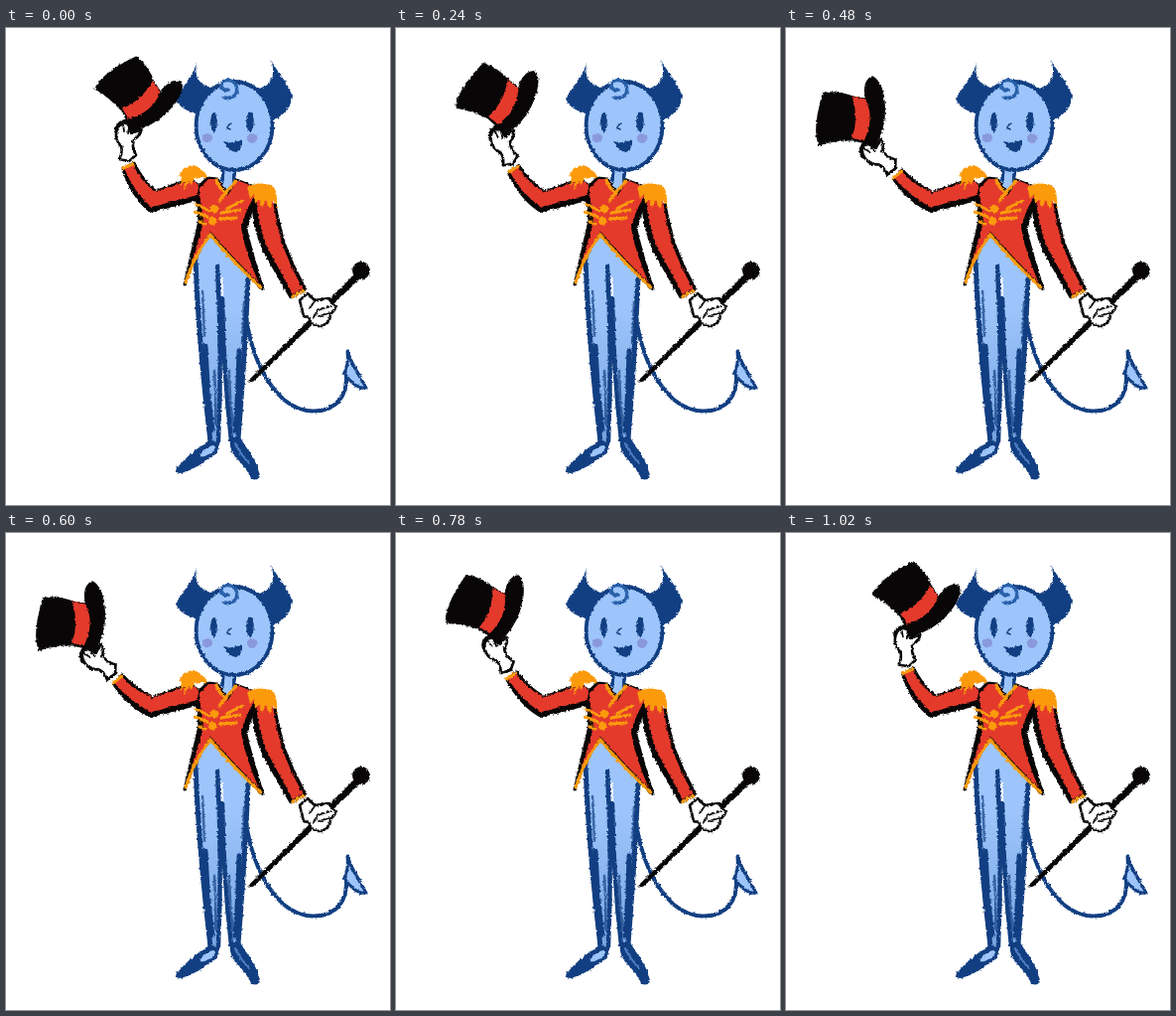
Write an HTML page that moves like this. It is 387 by 480 pixels and loops after 1.08 s.

```html
<!DOCTYPE html>
<html lang="en">
<head>
<meta charset="utf-8">
<title>Tipping the hat</title>
<style>
  html, body { margin: 0; width: 100%; height: 100%; overflow: hidden; background: #fff; }
  svg { display: block; width: 100vw; height: 100vh; }
  path, line { stroke-linecap: round; stroke-linejoin: round; }
  .navy { fill: #123f82; }
  .skin { fill: #9dc5fb; }
  .ink { fill: none; stroke: #123f82; }
  .red { fill: #e43a2c; }
  .gold { fill: #fb9b0c; }
  .braid { fill: none; stroke: #fb9b0c; stroke-width: 3; }
  .edge { fill: #080606; stroke: #080606; stroke-width: 3; }
  .glove { fill: #fff; stroke: #080606; stroke-width: 2.6; }
  .crease { fill: none; stroke: #080606; stroke-width: 1.8; }
</style>
</head>
<body>
<svg viewBox="0 0 387 480">
  <defs>
    <filter id="brush" filterUnits="userSpaceOnUse" x="0" y="0" width="387" height="480" color-interpolation-filters="sRGB">
      <feTurbulence type="fractalNoise" baseFrequency=".38" numOctaves="2" seed="4"/>
      <feDisplacementMap in="SourceGraphic" scale="3.2" xChannelSelector="R" yChannelSelector="G"/>
    </filter>
    <linearGradient id="leg" x1="0" y1="210" x2="0" y2="415" gradientUnits="userSpaceOnUse">
      <stop offset=".35" stop-color="#9dc5fb"/>
      <stop offset="1" stop-color="#78a5e2"/>
    </linearGradient>
  </defs>

  <g filter="url(#brush)">
    <!-- tail -->
    <path class="ink" stroke-width="4" d="M241 285C246 325 258 354 280 374C298 389 322 389 335 376C342 368 344 359 343 347"/>
    <path class="skin" stroke="#123f82" stroke-width="3" d="M344 325C348 338 356 350 363 362C356 364 347 357 341 347C344 341 345 334 344 325Z"/>
    <path class="ink" stroke-width="3" d="M345 327C347 336 352 343 356 349"/>

    <!-- legs -->
    <path fill="url(#leg)" d="M207 207L190 232Q193 310 206 416L214 416Q218 340 216 250L219 250Q219 340 226 416L235 416Q240 330 245 252Z"/>
    <path class="ink" stroke-width="5" d="M191 233Q194 315 206 416M244 252Q240 340 234 413"/>
    <path class="ink" stroke-width="4.5" d="M213 240Q218 325 214 416M218 272Q219 345 227 415"/>
    <path class="ink" stroke-width="5" d="M201 320Q203 370 208 405M235 325Q234 370 231 405"/>
    <path class="ink" stroke-width="2.5" opacity=".7" d="M210 345Q212 375 211 398M225 345Q226 380 229 400M198 265L200 310M240 275L238 318"/>

    <!-- feet -->
    <path class="navy" d="M204 414L214 417Q216 428 204 434Q190 444 176 448Q169 448 172 443Q184 429 196 421Q203 418 204 414Z"/>
    <path class="skin" d="M203 422Q211 418 211 422Q209 428 200 431Q190 433 203 422Z"/>
    <path class="navy" d="M226 412L236 412Q241 421 248 430Q254 441 256 451Q253 457 247 453Q241 441 233 434Q224 425 226 412Z"/>
    <path fill="none" stroke="#4d7dc4" stroke-width="2" d="M231 418Q238 431 245 438"/>

    <!-- neck -->
    <path class="skin" d="M219 138L232 138L230 156L224 166L215 154Z"/>
    <path class="ink" stroke-width="3.5" d="M219 140L218 153M232 139L229 153"/>

    <!-- jacket -->
    <path class="edge" d="M203 151L190 164Q194 180 195 194Q188 224 180 258Q190 228 206 207Q228 233 259 263Q247 225 242 203Q245 186 253 173L250 160L232 153L223 167L213 152Z"/>
    <path class="edge" d="M249 176Q250 202 260 224L287 271L302 263Q288 238 280 216Q275 198 271 178Z"/>
    <path class="red" d="M204 152L193 163Q198 180 199 195Q192 220 183 249Q194 222 206 205Q228 230 255 257Q241 226 237 201Q241 184 250 170L250 160L233 153L223 169L213 152Z"/>
    <path class="red" d="M252 168Q253 196 263 220L289 268L299 262Q285 237 277 213Q272 194 269 174Z"/>
    <path class="braid" stroke-width="2.5" d="M181 256Q190 228 206 208Q230 237 257 261"/>
    <path class="braid" d="M212 153Q215 163 222 165L232 154M222 165L215 174"/>
    <path class="braid" d="M191 177L205 184M191 185L203 190M195 195L201 197M217 186L236 183M216 192L232 191M222 182L238 174"/>
    <circle class="gold" cx="210" cy="182" r="4.2"/>
    <circle class="gold" cx="208" cy="194" r="4.2"/>
    <path class="braid" stroke-width="4" d="M289 270L300 264"/>
    <path class="gold" d="M243 160Q253 154 268 158Q274 163 273 181L269 173L266 182L262 173L258 181L255 172L251 177L250 167L246 172Z"/>

    <!-- cane -->
    <path class="edge" stroke-width="1" d="M246 355L355 246L358 249L249 354Z"/>
    <circle cx="358" cy="244" r="9" fill="#080606"/>
    <path class="glove" d="M296 274L304 267L311 274L325 272Q328 277 333 280Q331 285 327 288Q327 297 318 300Q308 301 305 291L300 290Z"/>
    <path class="crease" stroke-width="2.4" d="M311 275L306 282M328 280L314 284L310 291M326 287L315 290"/>

    <!-- head -->
    <path class="navy" d="M193 32C190 45 182 54 171 71C174 80 184 85 195 86L211 60C195 60 188 48 193 32Z"/>
    <path class="navy" d="M267 32C272 42 283 54 289 68C287 82 276 92 264 94L248 61C266 63 273 48 267 32Z"/>
    <ellipse class="skin" cx="230" cy="98.5" rx="38.5" ry="44.5" stroke="#123f82" stroke-width="3.8"/>
    <path class="skin" d="M216 61C214 50 228 48 233 58C236 69 226 76 218 73L220 66Z"/>
    <path fill="none" stroke="#285fa9" stroke-width="3.5" d="M217 60C215 51 228 50 232 58C235 67 228 72 220 70M217 59Q220 64 224 62"/>
    <ellipse class="navy" cx="209.5" cy="95" rx="3.3" ry="10"/>
    <ellipse class="navy" cx="246" cy="94.5" rx="3.7" ry="10"/>
    <circle cx="203" cy="110.5" r="5" fill="#8a98dc"/>
    <circle cx="248" cy="111" r="5" fill="#8a98dc"/>
    <path class="ink" stroke-width="1.5" d="M227 96L222 100L226 102"/>
    <path class="navy" d="M219 114Q229 117 238 112Q239 122 232 125Q224 124 219 114Z"/>
  </g>

  <g filter="url(#brush)">
    <path class="edge" d="M186 152L147 166Q139 176 146 184L194 172L193 158Z"/>
    <g id="forearm">
      <path class="edge" d="M118 142L129 136Q137 153 150 164L152 181L145 184Q127 169 118 142Z"/>
      <path class="red" d="M119 141L128 137Q136 155 150 164L151 178L146 180Q129 165 119 141Z"/>
      <path class="braid" stroke-width="4" d="M118 141L128 137"/>
      <g id="hand">
        <path class="edge" stroke-width="1" d="M91 61Q98 46 131 30Q142 39 148 54L157 68L124 95L117 82Q104 68 91 61Z"/>
        <path class="red" d="M117 81Q137 73 148 53L157 67Q147 87 126 96Q122 88 117 81Z"/>
        <path class="edge" stroke-width="1" d="M111 103C110 97 117 93 124 93Q148 86 156 67C160 59 168 52 176 55C179 67 161 91 136 100C124 104 114 108 111 103Z"/>
        <path class="glove" d="M114 132Q118 125 116 119Q110 113 111 106Q112 98 118 95L124 97L126 105L136 103Q136 108 129 112Q126 119 131 128L124 134Z"/>
        <path class="crease" d="M118 97L119 104M124 99L123 106M126 106L137 103"/>
      </g>
    </g>
    <path class="red" d="M187 153L149 165Q140 174 147 180L193 168L194 158Z"/>
    <path class="gold" d="M174 149Q180 138 190 138Q200 143 204 152Q196 149 193 152L190 151L186 158L185 153L179 163L180 154L175 159L178 150Z"/>
  </g>
</svg>
<script>
  const LOOP = 1080, STEP = 60;
  const forearm = document.getElementById("forearm");
  const hand = document.getElementById("hand");
  const start = performance.now();

  const turn = (part, angle, x, y) =>
    part.setAttribute("transform", `rotate(${angle.toFixed(3)} ${x} ${y})`);

  function draw() {
    const time = (performance.now() - start) % LOOP;
    const held = Math.floor(time / STEP) * STEP;
    const swing = (1 - Math.cos(2 * Math.PI * held / LOOP)) / 2;
    turn(forearm, -17 * swing, 147, 180);
    turn(hand, -32 * swing, 121, 136);
    requestAnimationFrame(draw);
  }
  draw();
</script>
</body>
</html>
```
